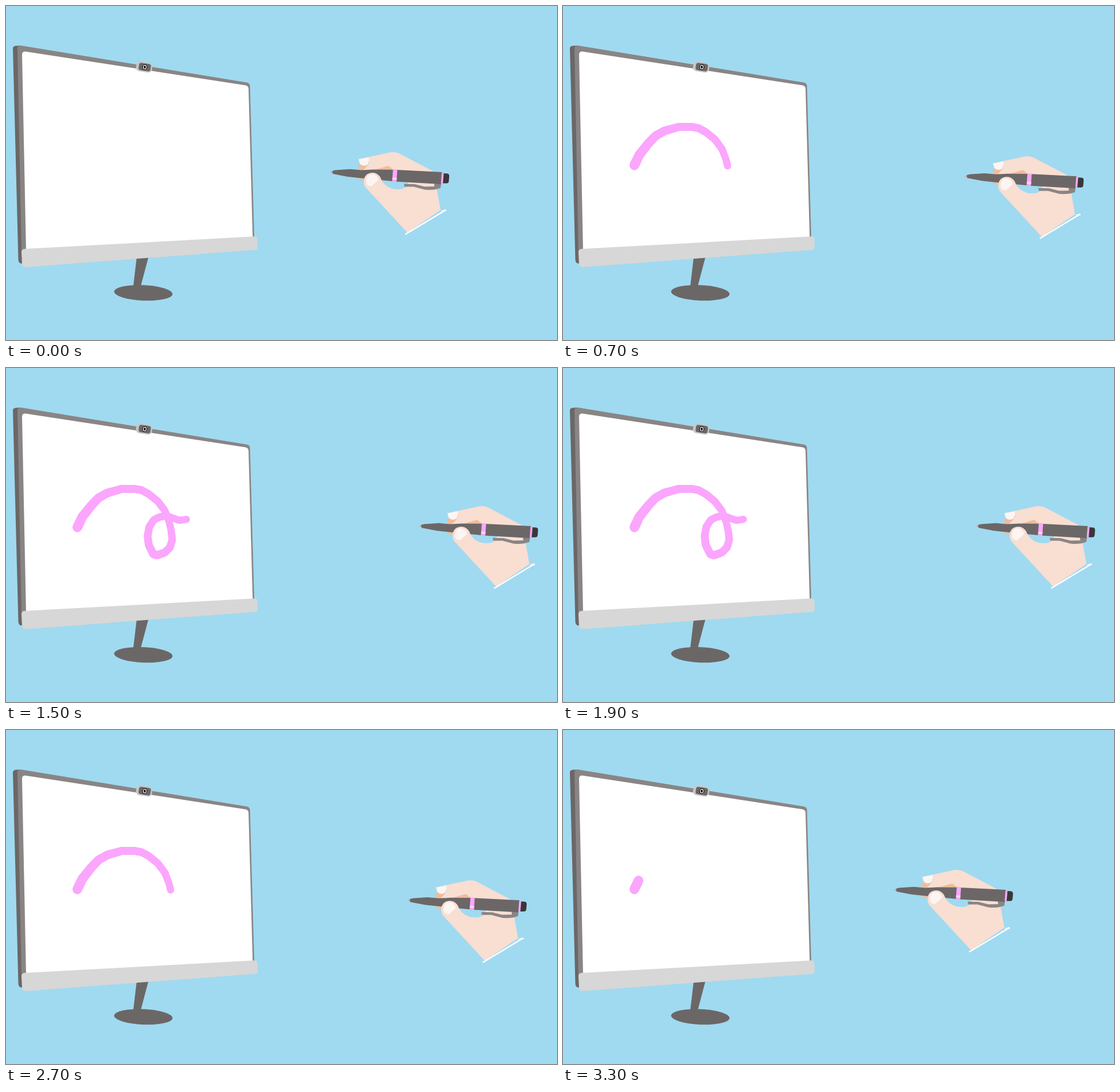
Animation of 961x583 px, one loop 3400 ms. Source, as an HTML page with a canvas:

```html
<!DOCTYPE html>
<html lang="en">
<head>
<meta charset="utf-8">
<title>Remote drawing</title>
<style>
  html, body { margin: 0; width: 100%; height: 100%; overflow: hidden; background: #a0daf0; }
  svg, canvas { position: absolute; left: 0; top: 0; display: block; }
  .dark { fill: #6b6767; }
  .grey { fill: #8a8585; }
  .light { fill: #d7d7d7; }
  .skin { fill: #f9ded2; }
  .shade { fill: #f2bb9b; }
  .nail { fill: #fdf5f2; }
  .pink { fill: #fba6fd; }
  .cap { fill: #3a3738; }
  .white { fill: #fff; }
</style>
</head>
<body>
<svg width="961" height="583" viewBox="0 0 961 583">
  <defs>
    <path id="route" d="M124.5 278L133 260 148 241 161 227 177 218 202 211 224 211 236 213
      249 220 265 233 277 249 284 267 288 283 290 300 286 313 277 322 263 327 257 325
      249 309 247 293 250 277 258 265 268 260 280 258 291 262 303 266 315 264 335 247 349 225"/>
  </defs>

  <g id="monitor">
    <path class="dark" d="M228 438L248.500 438 235 489 222 489Z"/>
    <ellipse class="dark" cx="239.500" cy="500.700" rx="51" ry="13.500" transform="rotate(2.500 239.500 500.700)"/>
    <path class="dark" d="M12 74Q12 70 17 69.500L26 69 34 449 27 449.500Q22 449 21.500 443Z"/>
    <path class="grey" d="M20 74Q20 69 26 69L420 133.500Q425 134.500 425.500 139L433 406 35 432 27 432Z"/>
    <path class="white" d="M28 85Q28 79 34 79.500L418 138.500Q422.500 139.500 423 144L430.300 406 35 426Z"/>
    <path class="light" d="M27 430Q27 424.500 32 424L433 402.300Q438 402 438.300 406L439 421Q439 425 434 425.700L35 455.700Q28.500 456 28 450Z"/>
  </g>

  <g id="camera" transform="rotate(9 241 106.500)">
    <rect x="227" y="98" width="28" height="17" rx="6" fill="#c9c7c7"/>
    <rect class="dark" x="231.500" y="100" width="21" height="13" rx="4"/>
    <ellipse cx="242" cy="106.500" rx="4.200" ry="5" fill="#000"/>
    <ellipse cx="242" cy="106.500" rx="2.500" ry="3.200" fill="#000" stroke="#fff" stroke-width="1.300"/>
  </g>

  <g id="hand">
    <path class="shade" d="M615 277L632 277 666 278 678 287 678 300 628 304 615 304Z"/>
    <path class="skin" d="M615 267.500L670 255.400Q679 254 686 257.500L744 288 740 300 690 300 676 286 667 279 637 287.500 622 287Q631 280 634 271Z"/>
    <path class="nail" d="M615 267.500L632.500 264Q635 272 629.500 277.500Q622 281 617 275Z"/>
    <path class="skin" d="M624.500 306L656 306Q666 320 684 320Q696 320 701 311L701 298 750 298 751.500 320 758 356 700 395.500 627.500 317Q624 312 624.500 306Z"/>
    <path d="M696.500 398.500L766 356.500" stroke="#fff" stroke-width="2.500"/>
    <path class="white" d="M758 357.500L767 355 768 357.500 764 359Z"/>

    <path class="grey" d="M694 310.500L713 311 730 315.300 747 315 747 308 759 308 758 317.500Q746 322.500 730 320.500L711 315.500 695 315.500Z"/>
    <path fill="#dd9fae" d="M565 290L571 287.500 571 293Z"/>
    <path class="dark" d="M569 288L574 286.500 600 284.800 620 286.500 640 285.500 677 285.700 761 290 759 311 680 306.500 650 303.500 620 300.500 596 298 570 293Z"/>
    <path class="pink" d="M675 285L682.500 285.500 681 307 673.500 306Z"/>
    <path d="M674 299.500L681.500 300 681.300 303.500 673.800 303Z" fill="#fdd3fe"/>
    <path class="pink" d="M760 290.500L763.500 291 762 309.500 758.500 309.500Z"/>
    <path class="cap" d="M763.500 292L770 292.500Q773.500 293 773 298L772.300 306Q772 309.500 768 309.500L762 309.500Z"/>

    <path class="skin" d="M624.300 306C624 293 636 289 645 292Q652 295 655 304Q660 315 670 318.500L660 335 627.500 317Q624.300 313 624.300 306Z"/>
    <path class="nail" d="M628 306Q628 296 636 293.500Q645 292.500 649 301Q650 304 647 306L638 314Q635 315.500 631 313Q628 310 628 306Z"/>
  </g>
</svg>
<canvas id="ink" width="961" height="583"></canvas>

<script>
  const STEP = 100, TURN = 17, TIP = { x: 565, y: 290 };
  const route = document.getElementById('route');
  const hand = document.getElementById('hand');
  const ctx = document.getElementById('ink').getContext('2d');
  ctx.strokeStyle = '#fba6fd';
  ctx.lineCap = 'round';

  // step -> drawn length, pen tip offset x and y from the end of the line
  const pose = [
    [0, 0, 440.5, 12],
    [1, 17, 445, 16.4],
    [4, 134, 430, 22],
    [6, 212, 417, 18],
    [7, 229, 413, 18],
    [11, 314, 411, 8.5],
    [15, 422, 405, 12],
    [17, 474, 403, 11]
  ];
  // length -> line width
  const girth = [[0, 17], [110, 14], [220, 12], [290, 14], [350, 13], [422, 12], [480, 12]];

  function lookup(rows, key) {
    const i = Math.max(1, rows.findIndex(r => r[0] >= key));
    const a = rows[i - 1], b = rows[i];
    const f = (key - a[0]) / (b[0] - a[0]);
    return a.slice(1).map((v, j) => v + (b[j + 1] - v) * f);
  }

  function drawInk(length) {
    ctx.clearRect(0, 0, 961, 583);
    let from = route.getPointAtLength(0);
    for (let s = 0; s < length;) {
      s = Math.min(s + 2, length);
      const to = route.getPointAtLength(s);
      ctx.lineWidth = lookup(girth, s)[0];
      ctx.beginPath();
      ctx.moveTo(from.x, from.y);
      ctx.lineTo(to.x, to.y);
      ctx.stroke();
      from = to;
    }
  }

  let shown = -1;
  function tick() {
    const n = Math.floor(performance.now() / STEP) % (2 * TURN);
    const k = Math.min(n, 2 * TURN - n);
    if (k !== shown) {
      shown = k;
      const [length, dx, dy] = lookup(pose, k);
      const end = route.getPointAtLength(length);
      drawInk(length);
      hand.setAttribute('transform', `translate(${end.x + dx - TIP.x} ${end.y + dy - TIP.y})`);
    }
    requestAnimationFrame(tick);
  }
  tick();
</script>
</body>
</html>
```
